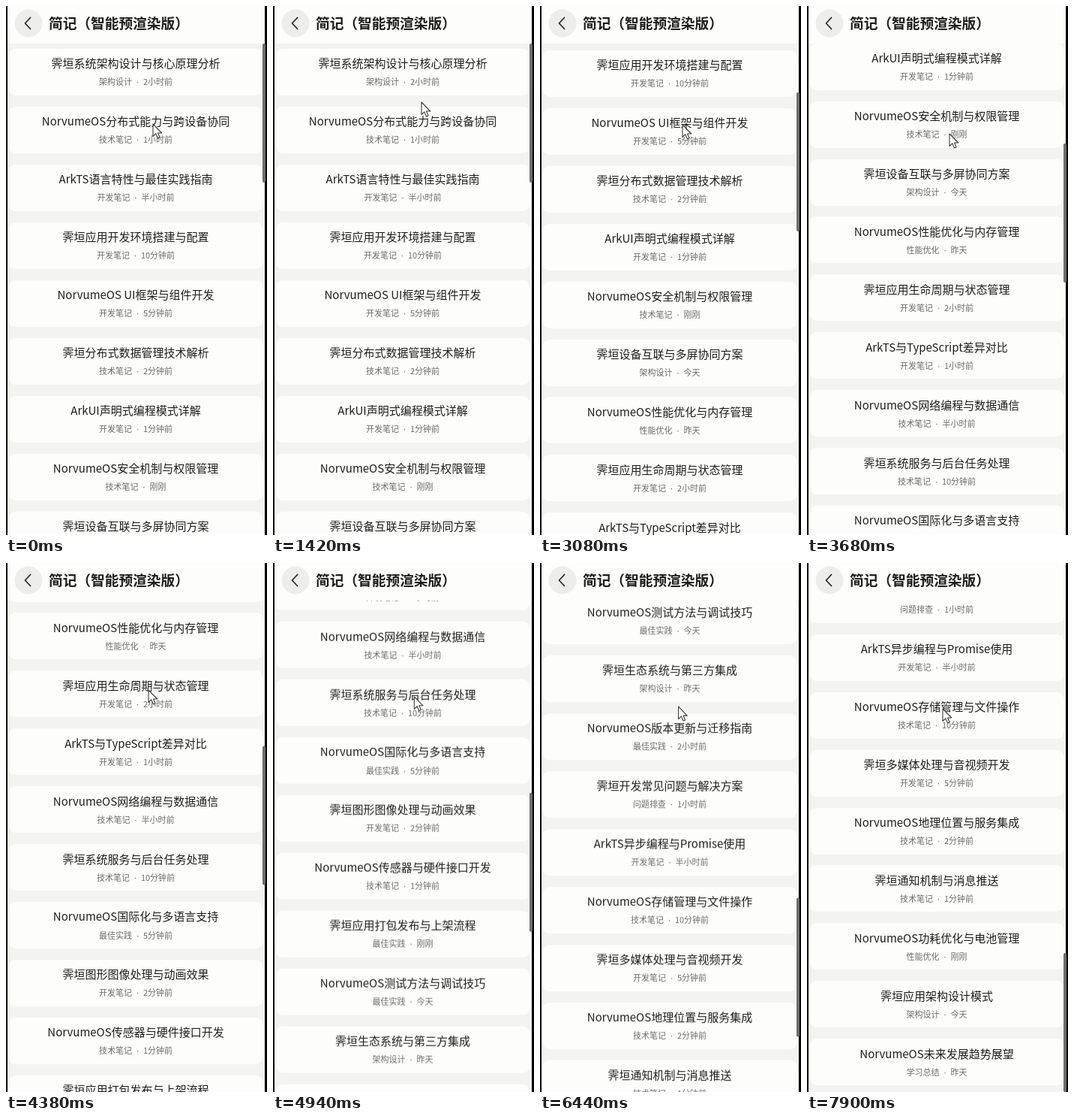
These frames come from a looping animation (348x704 px, 8 s). An HTML page:

```html
<!DOCTYPE html>
<html lang="zh-CN">
<head>
<meta charset="utf-8">
<title>简记</title>
<style>
  html, body { margin: 0; width: 100%; height: 100%; overflow: hidden; background: #000; }
  #stage {
    position: relative; width: 348px; height: 704px; overflow: hidden; background: #000;
    font-family: "Noto Sans CJK SC", "Noto Sans CJK", sans-serif; color: #1e1e1c;
  }
  #stage * { position: absolute; white-space: nowrap; }
  #header { left: 2px; top: 0; width: 343px; height: 50px; background: #fdfdfc; }
  #header b { left: 55px; top: 9px; font-size: 18.7px; line-height: 26px; }
  #view { left: 2px; top: 50px; width: 343px; height: 654px; overflow: hidden; background: #f3f3f1; }
  #list { left: 1px; top: 7px; width: 340px; will-change: transform; }
  .card { left: 0; width: 340px; height: 62px; border-radius: 10px; background: #fdfdfc; text-align: center; }
  .title { left: 0; right: 0; top: 9.3px; font-size: 15px; line-height: 20px; font-weight: 500; }
  .meta { left: 0; right: 0; top: 36.4px; font-size: 11px; line-height: 14px; color: #6c6c69; }
  #stage .meta i { position: static; display: inline-block; width: 15px; font: 11px/14px "Noto Sans", sans-serif; }
  #thumb { left: 342px; top: 50px; width: 4px; height: 185px; border-radius: 2px; background: #6e6e6c; }
  svg { left: 0; top: 0; }
</style>
</head>
<body>
<div id="stage">
  <div id="view"><div id="list"></div></div>
  <div id="header"><b>简记（智能预渲染版）</b></div>
  <div id="thumb"></div>
  <svg width="348" height="704">
    <circle cx="30" cy="23" r="18.5" fill="#ededeb"/>
    <path d="M32.5 15.5 25.5 23l7 7.5" fill="none" stroke="#2c2c2a" stroke-width="1.8" stroke-linecap="round" stroke-linejoin="round"/>
    <path id="cursor" d="M0 0V16.5l3.8-3.6 2.7 6 2.6-1.1-2.6-5.8h5.2z" fill="#fdfdfc" stroke="#3c3c3a" stroke-width="1.1" stroke-linejoin="round"/>
  </svg>
</div>
<script>
const LOOP = 8000, PITCH = 76.94, MAX_SCROLL = 1655, THUMB_TRAVEL = 469;

const notes = `霁垣系统架构设计与核心原理分析|架构设计
NorvumeOS分布式能力与跨设备协同|技术笔记
ArkTS语言特性与最佳实践指南|开发笔记
霁垣应用开发环境搭建与配置|开发笔记
NorvumeOS UI框架与组件开发|开发笔记
霁垣分布式数据管理技术解析|技术笔记
ArkUI声明式编程模式详解|开发笔记
NorvumeOS安全机制与权限管理|技术笔记
霁垣设备互联与多屏协同方案|架构设计
NorvumeOS性能优化与内存管理|性能优化
霁垣应用生命周期与状态管理|开发笔记
ArkTS与TypeScript差异对比|开发笔记
NorvumeOS网络编程与数据通信|技术笔记
霁垣系统服务与后台任务处理|技术笔记
NorvumeOS国际化与多语言支持|最佳实践
霁垣图形图像处理与动画效果|开发笔记
NorvumeOS传感器与硬件接口开发|技术笔记
霁垣应用打包发布与上架流程|最佳实践
NorvumeOS测试方法与调试技巧|最佳实践
霁垣生态系统与第三方集成|架构设计
NorvumeOS版本更新与迁移指南|最佳实践
霁垣开发常见问题与解决方案|问题排查
ArkTS异步编程与Promise使用|开发笔记
NorvumeOS存储管理与文件操作|技术笔记
霁垣多媒体处理与音视频开发|开发笔记
NorvumeOS地理位置与服务集成|技术笔记
霁垣通知机制与消息推送|技术笔记
NorvumeOS功耗优化与电池管理|性能优化
霁垣应用架构设计模式|架构设计
NorvumeOS未来发展趋势展望|学习总结`.split("\n").map(line => line.split("|"));

// The time labels repeat every ten notes.
const ages = ["2小时前", "1小时前", "半小时前", "10分钟前", "5分钟前", "2分钟前", "1分钟前", "刚刚", "今天", "昨天"];

const byId = id => document.getElementById(id);
const list = byId("list"), thumb = byId("thumb"), cursor = byId("cursor");

list.innerHTML = notes.map(([title, kind], i) =>
  `<div class="card" style="top:${(i * PITCH).toFixed(2)}px">
     <div class="title">${title}</div>
     <div class="meta">${kind}<i>·</i>${ages[i % ages.length]}</div>
   </div>`).join("");

// Keys are [time, ...values]; each scroll key is the pause after one turn of the wheel.
const scrollKeys = [[2480, 0], [3080, 229], [3680, 469], [4380, 683], [5000, 908],
  [5640, 1132.6], [6280, 1360], [6920, 1587], [7200, MAX_SCROLL]];
const cursorKeys = [[0, 196, 157], [1420, 198, 128], [3080, 190, 158], [3680, 190, 170],
  [4380, 190, 169], [5640, 186, 190], [7900, 181, 194]];

const smooth = u => u * u * (3 - 2 * u);

function sample(keys, time) {
  const next = keys.findIndex(key => key[0] > time);
  if (next === 0) return keys[0].slice(1);
  if (next < 0) return keys[keys.length - 1].slice(1);
  const [t0, ...from] = keys[next - 1], [t1, ...to] = keys[next];
  const u = smooth((time - t0) / (t1 - t0));
  return from.map((value, i) => value + (to[i] - value) * u);
}

function draw() {
  const time = performance.now() % LOOP;
  const [scroll] = sample(scrollKeys, time);
  const [x, y] = sample(cursorKeys, time);
  list.style.transform = `translateY(${-scroll}px)`;
  thumb.style.transform = `translateY(${scroll / MAX_SCROLL * THUMB_TRAVEL}px)`;
  cursor.setAttribute("transform", `translate(${x} ${y})`);
  requestAnimationFrame(draw);
}
draw();
</script>
</body>
</html>
```
